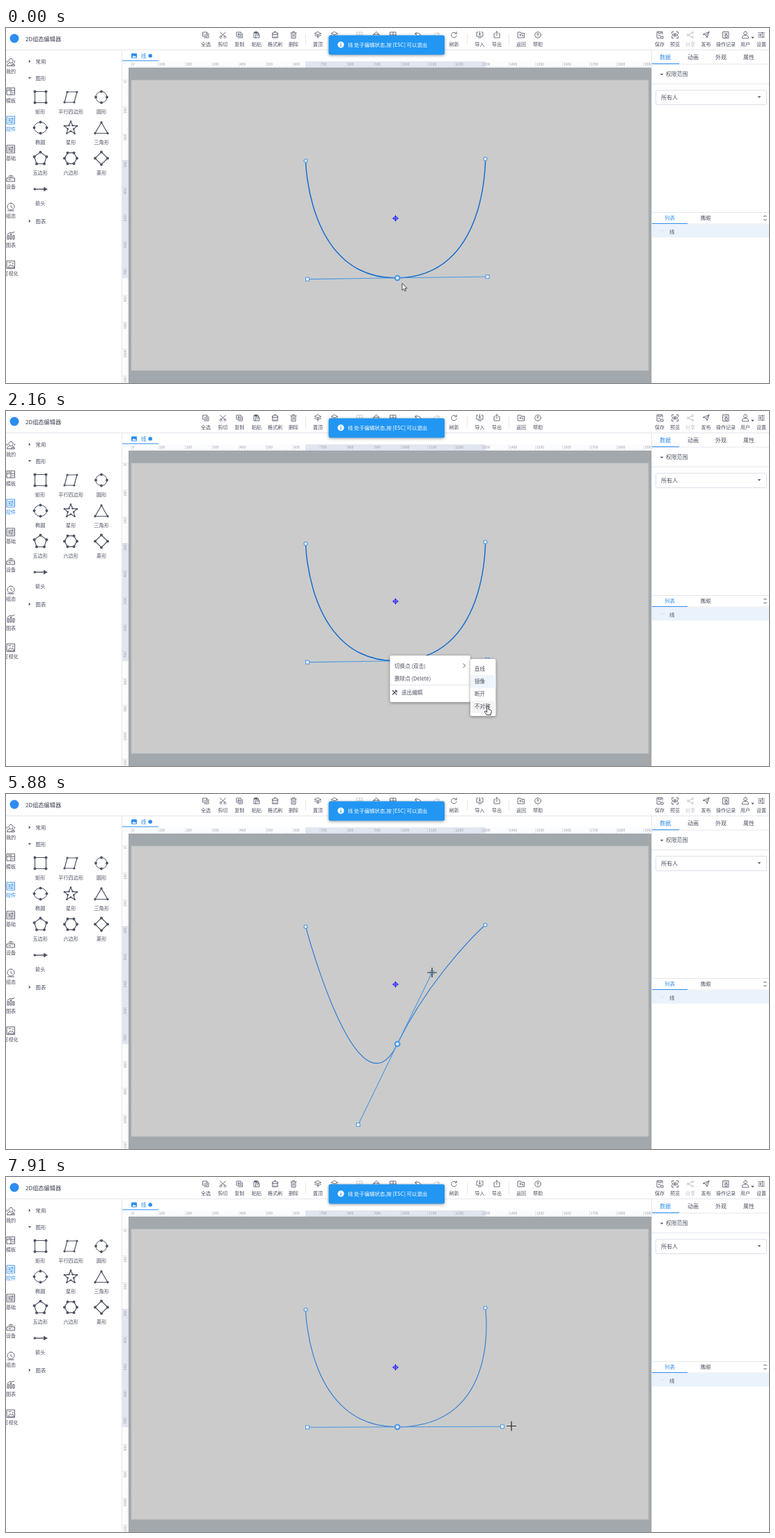
Recreate the animation shown at these times as an HTML page. Size 1096 by 511 pixels, loop 8000 ms.

```html
<!DOCTYPE html>
<html>
<head>
<meta charset="utf-8">
<title>2D组态编辑器</title>
<style>
html, body { margin: 0; width: 100%; height: 100%; overflow: hidden; background: #fff; }
svg { display: block; width: 1096px; height: 511px; font-family: "Noto Sans CJK SC", "Noto Sans CJK", "Noto Sans", sans-serif; }
.icon { fill: none; stroke: #5b6070; stroke-width: .9; stroke-linecap: round; stroke-linejoin: round; }
.shadow { filter: drop-shadow(0 1px 2px rgba(0,0,0,.4)); }
</style>
</head>
<body>
<svg id="stage" viewBox="0 0 1096 511"></svg>
<script>
const BLUE = '#2d8cf0', INK = '#4f5464', LINE = '#e4e7ec';
const stage = document.getElementById('stage');

// Markup helpers
const rect = (x, y, w, h, fill, extra = '') =>
  `<rect x="${x}" y="${y}" width="${w}" height="${h}" fill="${fill}" ${extra}/>`;
const path = (d, extra = '') => `<path d="${d}" ${extra}/>`;
const dot = (x, y, r, fill, extra = '') => `<circle cx="${x}" cy="${y}" r="${r}" fill="${fill}" ${extra}/>`;
const rule = (x1, y1, x2, y2, color = LINE, w = 1) => path(`M${x1} ${y1}L${x2} ${y2}`, `stroke="${color}" stroke-width="${w}"`);
// y is the vertical middle of the glyphs
const text = (s, x, y, size = 7.2, fill = INK, extra = '') =>
  `<text x="${x}" y="${y + size * .37}" font-size="${size}" fill="${fill}" ${extra}>${s}</text>`;
const mid = (s, x, y, size, fill) => text(s, x, y, size, fill, 'text-anchor="middle"');
const icon = (name, x, y, color = '#5b6070', scale = 1) =>
  `<g class="icon" transform="translate(${x} ${y}) scale(${scale})" style="stroke:${color}">${path(ICONS[name])}</g>`;

// Icons sit around 0,0 within about ±5
const ICONS = {
  all: 'M-4-4H2V2H-4ZM4-2V4H-2M-2.5-1L-1 .5L1.5-2.5',
  cut: 'M-4-4L2.5 2M4-4L-2.5 2M-3 1.5a1.5 1.5 0 1 0 .1 0M3 1.5a1.5 1.5 0 1 0 .1 0',
  copy: 'M-4-4H2V2H-4ZM4-2V4H-2M-1-2.5V1M-2.7-.8H.7',
  paste: 'M-1 4H-4V-3.5H2.5V-1M-2.5-4.5H1V-2.5H-2.5ZM-1-1H4V4H-1ZM.5 1H2.5',
  brush: 'M-4-1V-3H-1V-5H1V-3H4V-1ZM-3.5-1L-4 4H4L3.5-1M-1.5 4V2M1.5 4V2',
  trash: 'M-4-3H4M-1.5-4.5H1.5M-3-3V4.5H3V-3M-1-1V2.5M1-1V2.5',
  layers: 'M0-4.5L4.5-2L0 0L-4.5-2ZM-4.5 .5L0 2.5L4.5 .5M0 0V4.5',
  align: 'M-4-4H4V4H-4ZM-4 0H4M0-4V4',
  lock: 'M-4-1H4V4H-4ZM-2.5-1V-2.5Q0-6 2.5-2.5V-1',
  undo: 'M-2.5-4L-4.5-1.5L-2 0M-4.5-1.5Q2-5 4 1',
  redo: 'M2.5-4L4.5-1.5L2 0M4.5-1.5Q-2-5-4 1',
  refresh: 'M3.7 1A3.8 3.8 0 1 1 2.8-2.6M3.8-4.3V-1.8H1.3',
  load: 'M-2.5-4H-4.5V2H4.5V-4H2.5M0-5V0M-1.5-1.5L0 0L1.5-1.5M-2 4H2',
  save: 'M-2.5-2H-4V4H4V-2H2.5M0 1V-5M-1.5-3.5L0-5L1.5-3.5',
  back: 'M-4.5-4H-1L0-2.5H4.5V4H-4.5ZM2.5 2V0H-2M-.8-1.3L-2 0L-.8 1.3',
  help: 'M4.3 0A4.3 4.3 0 1 1-4.3 0A4.3 4.3 0 1 1 4.3 0M-1.3-1Q-1-2.5 0-2.4Q2-2 0 0V.8M0 2.3V2.4',
  disk: 'M4-1V-4.5H-4V4.5H0M-2-4.5V-2H2V-4.5M-2 1H1M2 2H5V5H2Z',
  eye: 'M-4.5-2V-4.5H-2M2-4.5H4.5V-2M4.5 2V4.5H2M-2 4.5H-4.5V2M-4 0Q0-4 4 0Q0 4-4 0M-1 0A1 1 0 1 0 1 0A1 1 0 1 0-1 0',
  share: 'M-2.2-.5L2.3-2.8M-2.2 .5L2.3 2.8M-3.6-1.4a1.4 1.4 0 1 0 .1 0M3.2-4.7a1.4 1.4 0 1 0 .1 0M3.2 1.9a1.4 1.4 0 1 0 .1 0',
  send: 'M-4-1L4.5-4.5L1.5 4L0 .5ZM0 .5L4.5-4.5',
  log: 'M-4-4.5H4V4.5H-4ZM-2-2H2M2 0A2 2 0 1 1 1.9-.1M0 0V1.2',
  user: 'M0-5a2.4 2.4 0 1 0 .1 0M-4.5 4.5V3Q-3.5 .8-1.3 .5H1.3Q3.5 .8 4.5 3V4.5Z',
  sliders: 'M-4.5-3H4.5M-4.5 0H4.5M-4.5 3H4.5M1.5-4V-2M-1.5-1V1M2 2V4',
  mine: 'M0-5.5a3.2 3.2 0 1 0 .1 0M-2.5 1Q-5.5 1.5-5.5 5H5.5Q5.5 1.5 2.5 1M-5.5 0V-2M5.5 0V-2M1 5V3H4',
  template: 'M-5.5-5H5.5V5H-5.5ZM-5.5-1H5.5M0-1V5M-3.5-3H1M2 2H4',
  control: 'M-5.5-5.5H5.5V5.5H-5.5ZM-4-2.5H4M-4 0H4M-4 2.7H4M2-3.5V-1.5M-2-1V1M1 1.7V3.7',
  device: 'M-5.5 0H5.5V5H-5.5ZM-3.5-2Q0-6 3.5-2M-1.5-1.5Q0-3 1.5-1.5M-3 2.5H0M3 2.5H3.1',
  gauge: 'M0-5.5a5 5 0 1 0 .1 0M0-2V0L2 1.5M-4.5 5.5H4.5',
  chart: 'M-5 0V5H-3V0ZM-1-2V5H1V-2ZM3 0V5H5V0ZM-5-2L-1-5L1-4L5-5.5',
  visual: 'M-5.5-5.5H5.5V5.5H-5.5ZM-4 4L-1 0L1 2L2.5 .5L4.5 4ZM-3-3H0M3-3V-1'
};

const polygonPoints = (n, r, turn = -90, inner = r) => Array.from({ length: n }, (_, i) => {
  const a = (turn + 360 / n * i) * Math.PI / 180, q = i % 2 ? inner : r;
  return [q * Math.cos(a), q * Math.sin(a)];
});
const nodes = (pts, x, y, r) => pts.map(p => dot(x + p[0], y + p[1], r, INK)).join('');
const shape = (pts, x, y, r = 2) =>
  path('M' + pts.map(p => `${x + p[0]} ${y + p[1]}`).join('L') + 'Z', `fill="none" stroke="${INK}" stroke-width="1.2"`) + nodes(pts, x, y, r);
const round = (x, y, rx, ry) =>
  `<ellipse cx="${x}" cy="${y}" rx="${rx}" ry="${ry}" fill="none" stroke="${INK}"/>` +
  nodes([[0, -ry], [rx, 0], [0, ry], [-rx, 0]], x, y, 1.9);
const caret = (x, y, down) =>
  path(down ? `M${x - 2.3} ${y - 1.3}h4.6l-2.3 2.6Z` : `M${x - 1.2} ${y - 2.3}v4.6l2.5-2.3Z`, `fill="${INK}"`);

function toolbar() {
  const items = [
    ['全选', 287, 'all'], ['剪切', 311.5, 'cut'], ['复制', 335.5, 'copy'], ['粘贴', 360, 'paste'],
    ['格式刷', 386.5, 'brush'], ['删除', 413, 'trash'], ['置顶', 448, 'layers'], ['', 472, 'layers'],
    ['', 508, 'align', '#c8cbd0'], ['', 532, 'lock'], ['', 556, 'align'], ['', 592, 'undo'], ['', 618, 'redo', '#c8cbd0'],
    ['刷新', 643.5, 'refresh'], ['导入', 680.5, 'load'], ['导出', 705, 'save'], ['返回', 740, 'back'], ['帮助', 764, 'help'],
    ['保存', 939, 'disk'], ['预览', 961, 'eye'], ['分享', 983, 'share', '#b9bcc2'], ['发布', 1005.5, 'send'],
    ['操作记录', 1034, 'log'], ['用户', 1062, 'user'], ['设置', 1085, 'sliders']
  ];
  return dot(12, 15, 6.5, BLUE) + text('2D组态编辑器', 28, 15.5, 8.2, '#3c4050', 'font-weight="500"') +
    items.map(([label, x, name, color]) => icon(name, x, 10, color) + mid(label, x, 23.7, 7, color || INK)).join('') +
    [430.5, 662.5, 722.5].map(x => rule(x, 8, x, 24)).join('') + caret(1072.5, 14, true) + rule(0, 31.5, 1096, 31.5);
}

function sidebar() {
  const tabs = [['我的', 'mine'], ['模板', 'template'], ['控件', 'control'], ['基础', 'control'],
    ['设备', 'device'], ['组态', 'gauge'], ['图表', 'chart'], ['可视化', 'visual']];
  const names = ['矩形', '平行四边形', '圆形', '椭圆', '星形', '三角形', '五边形', '六边形', '菱形', '箭头'];
  const star = polygonPoints(10, 9.5, -90, 4.5);
  return tabs.map(([label, name], i) => {
    const y = 49.5 + 41.6 * i, color = i === 2 ? BLUE : INK;
    return icon(name, 7, y, color) + mid(label, 7, y + 12.8, 7.1, color);
  }).join('') +
    [['常用', 48], ['图形', 72], ['图表', 278]].map(([s, y]) => caret(34, y, y === 72) + text(s, 42.5, y, 7.4)).join('') +
    names.map((s, i) => mid(s, 49.2 + 44 * (i % 3), 120.8 + 44 * Math.floor(i / 3), 7.2)).join('') +
    shape([[-8, -8], [8, -8], [8, 8], [-8, 8]], 49.5, 99.5) +
    shape([[-5, -7.5], [9, -7.5], [5, 7.5], [-9, 7.5]], 93, 99.5, 1.6) +
    round(137, 99.5, 8, 8) + round(49.5, 143.5, 9, 8) +
    shape(star, 93, 144, 1.3) + shape([[0, -8], [9, 7.5], [-9, 7.5]], 137, 144, 1.7) +
    shape(polygonPoints(5, 9.3), 49.5, 188) + shape(polygonPoints(6, 9, 0), 93, 187.5) +
    shape(polygonPoints(4, 9), 137, 187.5) +
    rule(41, 232, 56, 232, INK, 1.4) + dot(41.3, 232, 1.8, INK) + path('M54 228.8L60 232L54 235.2Z', `fill="${INK}"`) +
    rule(166.5, 31, 166.5, 511);
}

function workspace() {
  const step = 38.72;
  let s = rect(167, 48, 760, 9, '#fbfcfd') + rect(167, 57, 9, 454, '#fbfcfd') +
    rect(430, 48, 259, 9, '#e1e6f0') + rect(167, 190, 9, 170, '#e1e6f0');
  for (let i = 0; i < 193; i++) {
    const x = 180 + i * step / 10, y = 75 + i * step / 10, major = i % 10 === 0;
    s += rule(x, major ? 49 : 55, x, 57, '#c5c9d0', .5);
    if (y < 511) s += rule(major ? 167 : 174, y, 176, y, '#c5c9d0', .5);
    if (!major) continue;
    s += text(i * 10, x + 1.2, 52.3, 5, '#9a9da5');
    if (y < 511) s += `<g transform="translate(171 ${y + 1.2}) rotate(-90)">${text(i * 10, 0, 0, 5, '#9a9da5', 'text-anchor="end"')}</g>`;
  }
  return s + rect(176, 57, 751, 454, '#a2a8ac') + rect(180, 75, 743, 418, '#cbcbcb', 'stroke="#b9bcbe" stroke-width=".6"') +
    rect(180, 36.5, 8, 7, BLUE, 'rx="1"') + path('M181 42.5L183.3 39.5L185 41.3L186 40.3L187.2 42.5Z', 'fill="#fff"') +
    text('线', 194, 40, 7.5, BLUE) + dot(207.2, 40, 2.8, BLUE) + rule(167, 47, 219, 47, BLUE, 1.2) +
    `<g fill="none" stroke="#1a1aff"><circle cx="559.5" cy="274" r="2.7"/><path d="M555 274H564M559.5 269.5V278.5"/></g>`;
}

function inspector() {
  return rect(927, 32, 169, 479, '#fff') + rule(927.5, 31, 927.5, 511) +
    ['数据', '动画', '外观', '属性'].map((s, i) => mid(s, 947 + 40 * i, 42, 8, i ? INK : BLUE)).join('') +
    rule(928, 52, 1096, 52) + rule(928, 51.5, 967, 51.5, BLUE, 1.2) +
    caret(942, 67, true) + text('权限范围', 948, 66.5, 7.8) + rule(928, 80.5, 1096, 80.5) +
    rect(933.5, 89.5, 159, 21, '#fff', `rx="2" stroke="#dcdfe6"`) + text('所有人', 941, 99.8, 8) + caret(1082, 99.5, true) +
    rule(928, 265.5, 1096, 265.5) + mid('列表', 953.5, 273.5, 7.4, BLUE) + mid('鹰眼', 1005, 273.5, 7.4) +
    path('M1088.5 272L1090.5 269.8L1092.5 272M1088.5 275L1090.5 277.2L1092.5 275', `fill="none" stroke="${INK}"`) +
    rule(928, 282, 1096, 282) + rule(928, 281.5, 979, 281.5, BLUE, 1.2) +
    rect(928, 283, 168, 18.5, '#eaf2fb') + path('M940 290Q943 296 946 290', 'fill="none" stroke="#d9e3ee"') + text('线', 953, 293, 7.4);
}

const toast = () =>
  rect(463.5, 10.5, 166.5, 28, '#2196f3', 'rx="2.5" class="shadow"') + dot(481, 24, 4.6, '#fff') +
  rule(481, 23.2, 481, 26.8, '#2196f3', 1.2) + dot(481, 21.6, .7, '#2196f3') +
  text('线 处于编辑状态,按 [ESC] 可以退出', 491, 23.8, 7.4, '#fff', 'font-weight="500"');

const menu = () =>
  rect(551.5, 352, 115.5, 67, '#fff', 'rx="2" class="shadow"') + text('切换点 (双击)', 558, 366.8, 7.6) +
  path('M656.8 363.5L659.8 366.5L656.8 369.5', `fill="none" stroke="${INK}"`) +
  text('删除点 (Delete)', 558, 385.5, 7.6) + rule(552, 394.5, 667, 394.5) +
  path('M555 402L561.5 408.5M555 408.5L561.5 402M559 401.5L562 404.5', `stroke="${INK}" stroke-width="1.2"`) +
  text('退出编辑', 568, 405, 7.6);

const submenu = () =>
  rect(667, 357, 36.5, 82, '#fff', 'rx="2" class="shadow"') + rect(667, 380, 36.5, 18.5, '#eff5fc') +
  rect(667, 417, 36.5, 18, '#f5f5f5', 'id="hover"') +
  ['直线', '镜像', '断开', '不对称'].map((s, i) => text(s, 673, 371 + 18.2 * i, 7.6)).join('');

const handle = id => `<rect id="${id}" x="-2.5" y="-2.5" width="5" height="5" fill="#eef4fb" stroke="#4a98e3"/>`;
const START = [430.5, 191], NODE = [562.2, 359.8], END = [688.5, 188.5], REST = [691.5, 358];

stage.innerHTML = rect(0, 0, 1096, 511, '#fff') + toolbar() + sidebar() + workspace() + inspector() + toast() +
  `<g fill="none"><path id="left"/><path id="right"/><path id="arms" stroke="#4a98e3" stroke-width="1.1"/></g>` +
  [START, END].map(p => dot(...p, 2.5, '#eef4fb', 'stroke="#4a98e3" stroke-width="1.1"')).join('') +
  dot(...NODE, 3.4, '#dde6f0', 'stroke="#4a98e3" stroke-width="2"') + handle('handleA') + handle('handleB') +
  `<g id="menu">${menu()}</g><g id="submenu">${submenu()}</g>` +
  `<g id="arrow">${path('M0 0V10L2.4 7.8L4 11.3L5.6 10.6L4 7.2H7.2Z', 'fill="#fff" stroke="#222" stroke-width=".8"')}</g>` +
  `<g id="cross">${path('M-7 0H7M0-7V7', 'stroke="#eee" stroke-width="2.2" opacity=".5"')}${path('M-7 0H7M0-7V7', 'stroke="#1c1c1c" stroke-width="1.2"')}</g>` +
  `<g id="hand">${path('M-1.2-5.5Q0-7 1.2-5.5V-1.5L4.5-.5Q5.5 0 5.3 1.5L4.2 6.5H-1.5L-4.5 2.2Q-4.5 .5-2.8 1.2L-1.2 2.5Z', 'fill="#fff" stroke="#222" stroke-width=".9"')}</g>`;

const ui = Object.fromEntries([...stage.querySelectorAll('[id]')].map(el => [el.id, el]));

// [time, pointer, x, y]
const POINTER = [
  [0, 'arrow', 569, 367.5], [150, 'arrow', 565, 363], [270, 'cross', 560, 361], [690, 'cross', 560, 360.5], [840, 'cross', 560.5, 359.5],
  [1120, 'arrow', 562, 361], [1250, 'hand', 573, 366], [1380, 'hand', 605, 367], [1510, 'hand', 640, 367],
  [1640, 'hand', 670, 371], [1770, 'hand', 678, 382], [1900, 'hand', 684, 399], [2030, 'hand', 689, 417], [2160, 'hand', 692, 431],
  [2440, 'arrow', 692, 421], [2710, 'arrow', 692, 408], [2860, 'arrow', 692, 386], [3010, 'arrow', 692, 366],
  [3170, 'cross', 693, 357], [3450, 'cross', 692, 359], [3700, 'cross', 692, 358], [4000, 'cross', 692, 358], [4570, 'arrow', 693.7, 357],
  [5430, 'cross', 680, 320], [5580, 'cross', 660, 289], [5730, 'cross', 635, 268], [5880, 'cross', 612, 257]
];
for (let i = 1; i <= 8; i++) POINTER.push([5880 + i * 157.5, 'cross', 612 + 63.5 * i / 8, 257 + 118 * i / 8]);
POINTER.push([7300, 'cross', 680, 371], [7440, 'cross', 684, 366.5], [7910, 'cross', 726, 358.5]);

const show = (el, on) => el.setAttribute('visibility', on ? 'visible' : 'hidden');
const place = (el, [x, y]) => el.setAttribute('transform', `translate(${x} ${y})`);

function render(t) {
  const [, kind, x, y] = POINTER.findLast(p => p[0] <= t);
  for (const name of ['arrow', 'cross', 'hand']) show(ui[name], name === kind);
  place(ui[kind], [x, y]);
  show(ui.menu, t >= 1120 && t < 2440);
  show(ui.submenu, t >= 1510 && t < 2440);
  show(ui.hover, t >= 2030 && t < 2440);

  // The far arm keeps its length and mirrors only the direction
  const b = t < 5430 ? REST : t < 7910 ? [x, y] : [713, 359.3];
  const dx = b[0] - NODE[0], dy = b[1] - NODE[1], k = 129.2 / Math.hypot(dx, dy);
  const a = [NODE[0] - dx * k, NODE[1] - dy * k];
  place(ui.handleA, a);
  place(ui.handleB, b);
  ui.arms.setAttribute('d', `M${a}L${NODE}L${b}`);
  ui.left.setAttribute('d', `M${START}C${START} ${a} ${NODE}`);
  ui.right.setAttribute('d', `M${NODE}C${b} ${END} ${END}`);
  [[ui.left, 4570], [ui.right, 2440]].forEach(([el, thinFrom]) => {
    el.setAttribute('stroke', t < thinFrom ? '#0f68cc' : '#2a7bd3');
    el.setAttribute('stroke-width', t < thinFrom ? 1.4 : 1.1);
  });
}

const begin = performance.now();
function tick() {
  render((performance.now() - begin) % 8000);
  requestAnimationFrame(tick);
}
tick();
</script>
</body>
</html>
```
